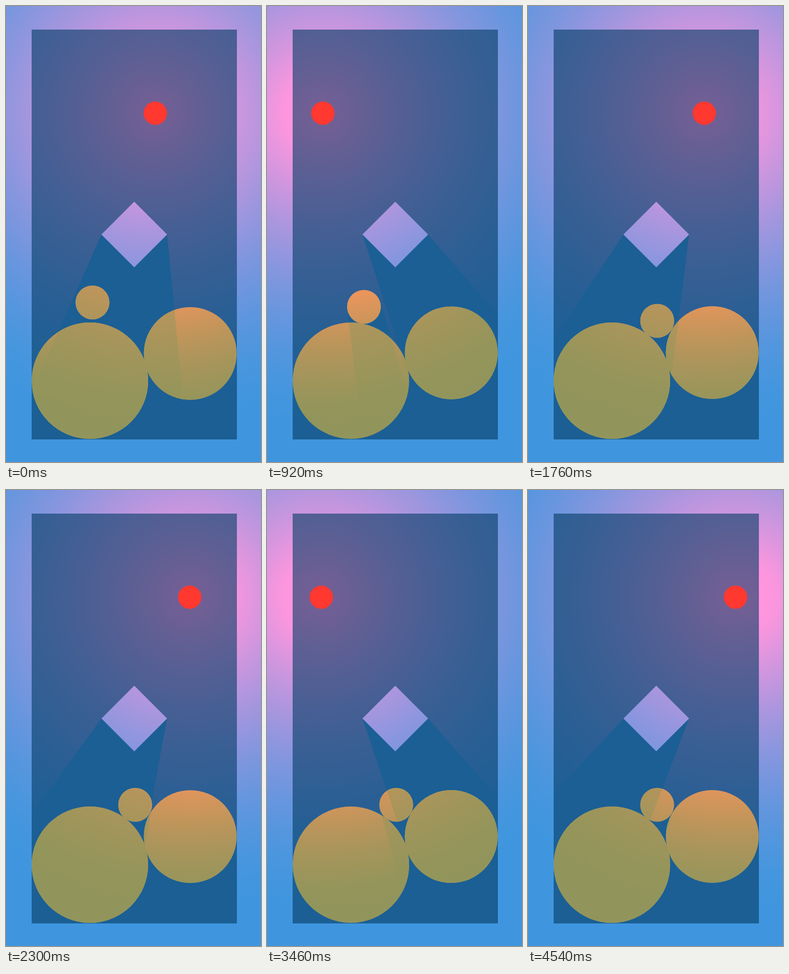
These frames come from a looping animation (497x889 px, 4.62 s). An HTML page with a canvas:

```html
<!DOCTYPE html>
<html lang="en">
<head>
<meta charset="utf-8">
<title>Moving lamp</title>
<style>
  html, body { margin: 0; width: 100%; height: 100%; overflow: hidden; }
  canvas { display: block; }
</style>
</head>
<body>
<canvas width="497" height="889"></canvas>
<script>
const ctx = document.querySelector('canvas').getContext('2d');
const LOOP = 4620, STEP = 77, LAST = 59;
const SHADE = '#1b5f94';
const DIAMOND = { x: 250, y: 445.5, r: 64 };
const LAMP = { y: 209, r: 22.8, start: 291, speed: 21.33, wall: 72, span: 353.5, reach: 600 };

// Red rises from base by gain towards the lamp; green and blue stay put
const AIR = { base: 64, gain: 233, gb: '150,222' };
const PANEL = { base: 27, gain: 92, gb: '95,148' };
const BALL_LIT = { base: 146, gain: 380, gb: '149,91' };
const BALL_DIM = { base: 146, gain: 190, gb: '149,91' };

// The lamp runs left first and bounces between two walls
function lampX(step) {
  const { start, speed, wall, span } = LAMP;
  const run = Math.abs(speed * step - (start - wall)) % (2 * span);
  return wall + span - Math.abs(span - run);
}

function glow(x, { base, gain, gb }) {
  const g = ctx.createRadialGradient(x, LAMP.y, 0, x, LAMP.y, LAMP.reach);
  for (let d = 0; d <= 1; d += 1 / 32) {
    const red = Math.min(255, base + gain * (1 - d) ** 1.6);
    g.addColorStop(d, `rgb(${red},${gb})`);
  }
  return g;
}

function polygon(...points) {
  const path = new Path2D();
  points.forEach(p => path.lineTo(...p));
  path.closePath();
  return path;
}

function disc({ x, y, r }) {
  const path = new Path2D();
  path.arc(x, y, r, 0, Math.PI * 2);
  return path;
}

function fill(path, style) {
  ctx.fillStyle = style;
  ctx.fill(path);
}

// Area hidden from the lamp behind the edge a-b
function shadow(x, a, b) {
  const far = ([px, py]) => [px + (px - x) * 6, py + (py - LAMP.y) * 6];
  return polygon(a, b, far(b), far(a));
}

function discShadow(x, ball) {
  const dx = ball.x - x, dy = ball.y - LAMP.y;
  const dist = Math.hypot(dx, dy), aim = Math.atan2(dy, dx);
  const spread = Math.asin(ball.r / dist), len = dist * Math.cos(spread);
  const touch = a => [x + len * Math.cos(a), LAMP.y + len * Math.sin(a)];
  return shadow(x, touch(aim + spread), touch(aim - spread));
}

// The small ball drops on the big one, rolls off it and rests against the third
function ballsAt(step) {
  const big = { x: 163.5, y: 730.5, r: 113.5 };
  const right = { x: 359.2, y: 675.5 + 2 * Math.exp(-step / 12), r: 90.5 };
  const angle = Math.min(0.648, 0.033 * Math.cosh(0.196 * step));
  const orbit = 146.3 + Math.max(0, 6.3 - 2.8 * step * step);
  const small = {
    x: big.x + orbit * Math.sin(angle),
    y: big.y - orbit * Math.cos(angle),
    r: 33
  };
  return [big, right, small];
}

function draw(step) {
  const x = lampX(step), balls = ballsAt(step);
  const air = glow(x, AIR), lit = glow(x, BALL_LIT), dim = glow(x, BALL_DIM);
  const { x: cx, y: cy, r } = DIAMOND;
  const left = [cx - r, cy], right = [cx + r, cy];
  const diamondShadow = shadow(x, left, right);
  const ballShadows = balls.map(ball => discShadow(x, ball));

  ctx.fillStyle = air;
  ctx.fillRect(0, 0, 497, 889);

  ctx.save();
  ctx.beginPath();
  ctx.rect(50, 46, 400, 799);
  ctx.fillStyle = glow(x, PANEL);
  ctx.fill();
  ctx.clip();
  for (const area of [diamondShadow, ...ballShadows]) fill(area, SHADE);
  ctx.restore();

  // Each ball is dimmed by everything that casts a shadow except itself
  balls.forEach((ball, i) => {
    const shape = disc(ball);
    fill(shape, lit);
    ctx.save();
    ctx.clip(shape);
    fill(diamondShadow, dim);
    ballShadows.forEach((area, k) => k !== i && fill(area, dim));
    ctx.restore();
  });

  fill(polygon(left, [cx, cy - r], right, [cx, cy + r]), air);
  fill(disc({ x, y: LAMP.y, r: LAMP.r }), '#ff3830');
}

function tick() {
  const t = performance.now() % LOOP;
  draw(Math.min(LAST, Math.floor(t / STEP + 0.2)));
  requestAnimationFrame(tick);
}
tick();
</script>
</body>
</html>
```
